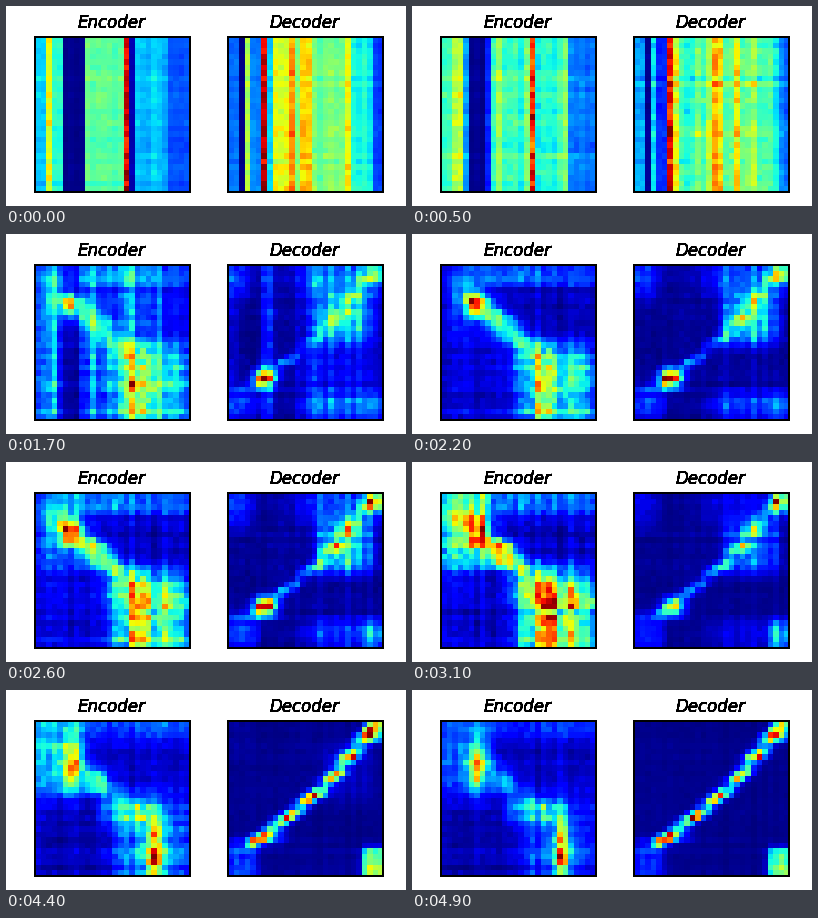
Recreate the animation shown at these times as a matplotlib script. Size 400x200 px, loop 6500 ms.

```python
import numpy as np
import matplotlib.pyplot as plt
from matplotlib.animation import FuncAnimation

N = 28
STEP_MS = 100
STEPS = 65
LAST_STEP = 49

rows, cols = np.mgrid[:N, :N]
rng = np.random.default_rng(7)


def ease(step, start, end):
    x = np.clip((step - start) / (end - start), 0, 1)
    return x * x * (3 - 2 * x)


def lerp(a, b, t, bump=0):
    """Go from a to b, with an extra bump halfway."""
    return a + (b - a) * t + 4 * bump * t * (1 - t)


def blob(row, col, height, width, power=4):
    return np.exp(-np.abs((rows - row) / height) ** power
                  - np.abs((cols - col) / width) ** power)


def bands(starts, levels):
    """Column stripes: each level holds from its start to the next one."""
    return np.array(levels)[np.searchsorted(starts, np.arange(N), side="right") - 1]


def streak_field():
    """Row, column and cell variation, unit scale."""
    return (0.6 * rng.normal(size=(N, 1)) + 0.6 * rng.normal(size=(1, N))
            + 0.45 * rng.normal(size=(N, N)))


def encoder_focus(late):
    ridge = np.exp(-((cols - 1.05 * rows) / 3) ** 2) * blob(10, 14, 6, 40)
    return (0.16
            + lerp(.3, .2, late) * ridge
            + lerp(.1, .22, late, .28) * blob(5.5, 4, 8, 4.8)
            + lerp(.7, .5, late, -.3) * blob(lerp(6.8, 8, late), 5.8, lerp(2, 4, late), 1.6, 2)
            + lerp(.15, .08, late, .35) * blob(10.7, 10.5, 2.4, 2.4)
            + lerp(.35, .2, late, .2) * blob(21.5, 20.5, 8, 7)
            + lerp(.25, .65, late) * blob(23, lerp(18, 21.3, late), 6, 1.5, 2)
            + lerp(.05, .25, late) * blob(16, 16, 2.5, 5)
            + lerp(.18, .12, late) * blob(1, 18, 2.2, 14))


def decoder_focus(late):
    path = np.interp(rows, [0, 5, 9, 13, 17, 20, 23], [26, 22, 19, 15, 10, 6, 3])
    beads = 0.35 + 0.65 * np.cos(np.pi * (rows - 5.7) / 3.7) ** 2
    ridge = np.exp(-((cols - path) / 1.6) ** 2) * beads * (rows < 23)
    fading = lerp(.14, 0, late)
    return (lerp(.08, .035, late)
            + lerp(.3, .9, late) * ridge
            + lerp(.28, 0, late, .08) * blob(9, 20.5, 5, 5)
            + lerp(.85, .15, late) * blob(20, lerp(6, 8, late), 1.7, 1.8, 2)
            + lerp(.25, .35, late, .2) * blob(1, 26, 2.2, 2)
            + lerp(.2, .5, late, .15) * blob(25.2, 25.7, 2.8, 2.2)
            + lerp(.18, .14, late, .05) * blob(24.5, 2, 3.5, 3)
            + fading * (blob(2, 20, 3.5, 8) + blob(25, 19, 2.8, 6) + blob(2, 1, 4, 3)))


class Panel:
    def __init__(self, left, title, first, second, focus, settled):
        self.first, self.second = first, second
        self.focus, self.settled = focus, settled
        self.fields = streak_field(), streak_field()
        ax = fig.add_axes([left / 400, 14 / 200, 155 / 400, 155 / 200])
        self.image = ax.imshow(np.zeros((N, N)), cmap="jet",
                               interpolation="nearest", aspect="auto")
        ax.set_xticks([])
        ax.set_yticks([])
        for spine in ax.spines.values():
            spine.set_linewidth(1.44)
        # Stacked copies harden the antialiased edges of the lettering.
        for _ in range(16):
            fig.text((left + 76.7) / 400, 178 / 200, title, fontsize=12,
                     family="DejaVu Sans", style="italic", ha="center", va="baseline")

    def draw(self, step):
        stripes = lerp(self.first, self.second, min(step / 10, 1))
        structure = ease(step, 10, self.settled)
        late = ease(step, 22, LAST_STEP)
        grid = lerp(stripes, self.focus(late), structure)
        angle = 0.12 * step
        noise = np.cos(angle) * self.fields[0] + np.sin(angle) * self.fields[1]
        strength = 0.06 + 0.06 * min(step / 10, 1) + 0.07 * structure
        grid = grid * np.exp(strength * noise)
        self.image.set_data(grid)
        self.image.set_clim(grid.min(), grid.max())
        return self.image


fig = plt.figure(figsize=(4, 2), dpi=100, facecolor="white")

panels = [
    Panel(29, "Encoder",
          bands([0, 2, 3, 5, 9, 16, 17, 18, 24],
                [.4, .72, .48, .1, .53, .92, .14, .38, .28]),
          bands([0, 3, 4, 5, 8, 10, 11, 15, 16, 18, 22, 23],
                [.58, .82, .18, .05, .3, .65, .4, .58, .75, .5, .7, .3]),
          encoder_focus, settled=22),
    Panel(222, "Decoder",
          bands([0, 2, 3, 4, 6, 7, 8, 11, 12, 13, 15, 21, 22, 26],
                [.3, .08, .6, .32, .95, .4, .7, .8, .6, .74, .57, .78, .45, .25]),
          bands([0, 2, 6, 7, 8, 12, 14, 16, 18, 19, 26],
                [.37, .13, .62, .88, .2, .39, .68, .45, .65, .45, .33]),
          decoder_focus, settled=20),
]


def update(frame):
    return [panel.draw(min(frame, LAST_STEP)) for panel in panels]


anim = FuncAnimation(fig, update, frames=STEPS, interval=STEP_MS,
                     repeat=True, repeat_delay=0, blit=False)
plt.show()
```
